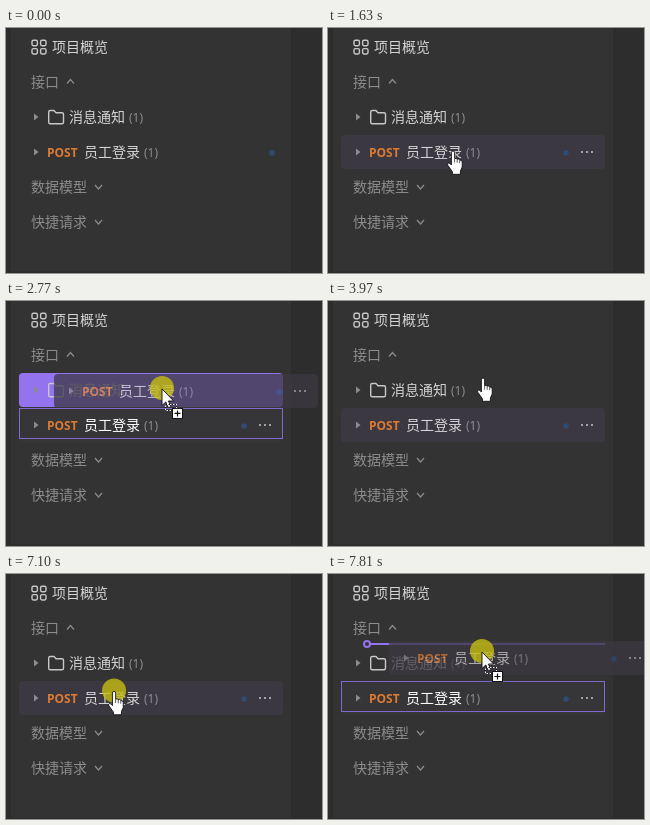
Recreate the animation shown at these times as an HTML page. Size 316 by 245 pixels, loop 8000 ms.

```html
<!DOCTYPE html>
<html lang="zh">
<head>
<meta charset="utf-8">
<style>
html, body { margin: 0; width: 100%; height: 100%; overflow: hidden; background: #2d2d2d; }
svg { display: block; width: 316px; height: 245px; }
text { font: 14px "Noto Sans CJK SC", "Noto Sans CJK", sans-serif; fill: #d4d4d4; }
.dim { fill: #8c8c8c; }
.count { font: 12px "Noto Sans", sans-serif; fill: #8c8c8c; }
.post { font: bold 12px "Noto Sans", sans-serif; fill: #dc7b33; }
.line { fill: none; stroke: #8c8c8c; stroke-width: 1.2; }
.icon { fill: none; stroke: #c8c8c8; stroke-width: 1.4; stroke-linejoin: round; }
</style>
</head>
<body>
<svg id="stage" viewBox="0 0 316 245"></svg>
<script>
const LOOP = 8000;
const PURPLE = '#9373ee';
const ROW = '#3c3842';

const label = (x, y, s, cls = '') => `<text x="${x}" y="${y}" class="${cls}">${s}</text>`;
const chevron = (x, y, d) => `<path class="line" d="M${x - 3.5} ${y - 2 * d}l3.5 ${4 * d}l3.5 ${-4 * d}"/>`;
const caret = y => `<path d="M28 ${y - 3.5}l4.5 3.5l-4.5 3.5z" fill="#8c8c8c"/>`;
const dots = y => [254, 259, 264].map(x => `<circle cx="${x}" cy="${y}" r="1" fill="#c4c4c4"/>`).join('');
const box = (id, y, fill) => `<rect id="${id}" x="13" y="${y}" width="264" height="34" rx="4" fill="${fill}"/>`;
const square = (x, y) => `<rect class="icon" x="${x}" y="${y}" width="5.4" height="5.4" rx="1.4"/>`;
const request = (id = '') => caret(124) + label(41, 129, 'POST', 'post') +
  `<text x="78" y="129" ${id}>员工登录</text>` + label(138, 129, '(1)', 'count');

const arrow = '<path d="M0 0V16.5L3.8 13L6.3 18.8L8.8 17.7L6.4 12H11.6Z" fill="#fff" stroke="#111" stroke-width=".9"/>';
const badge = `<rect x="3.5" y="15.5" width="11" height="6" fill="none" stroke="#fff"/>
  <rect x="3.5" y="15.5" width="11" height="6" fill="none" stroke="#111" stroke-dasharray="1.5 1.5"/>
  <rect x="10.5" y="19.5" width="10" height="10" fill="#fff" stroke="#111"/>
  <path d="M15.5 21.5v6M12.5 24.5h6" stroke="#111" stroke-width="1.2"/>`;
const hand = `<path d="M-1.6 1.6a1.6 1.6 0 0 1 3.2 0V7.6q1.7-.8 2.6.6q1.7-.6 2.5.8q2.3-.2 2.5 1.9V16l-1.8 4v3.3h-8v-2.6
  l-4.6-6.4q-.9-2 .9-2.3q1.4 0 2.7 2z" fill="#fff" stroke="#111" stroke-width=".9"/>
  <path d="M1.6 7.6v4M4.2 8.4v3.4M6.7 9.2v3" stroke="#333" stroke-width=".8"/>`;

const stage = document.getElementById('stage');
stage.innerHTML = `
  <rect width="316" height="245" fill="#2d2d2d"/>
  <rect x="5" width="280" height="243.5" fill="#333"/>
  ${square(26, 12.3)}${square(34.6, 12.3)}${square(26, 20.6)}${square(34.6, 20.6)}
  ${label(46, 24, '项目概览')}
  ${label(25, 59, '接口', 'dim')}${chevron(64.5, 53.5, -1)}
  ${box('folderBg', 72, '#2f2f2f')}
  ${box('target', 72, PURPLE)}
  ${caret(89)}
  <path class="icon" d="M42.7 84q0-1.5 1.5-1.5h3.8l2 2.2h6q1.5 0 1.5 1.5v8q0 1.5-1.5 1.5H44.2q-1.5 0-1.5-1.5z"/>
  ${label(63, 94, '消息通知')}${label(123, 94, '(1)', 'count')}
  <g id="folderTools">${dots(89)}<path d="M226 89h10M231 84v10" stroke="#b8b8b8" stroke-width="1.2"/></g>
  ${box('postBg', 107, ROW)}
  <rect id="border" x="13.5" y="107.5" width="263" height="30" fill="none" stroke="#8068cc"/>
  ${request('id="title"')}
  <circle id="dot" cy="125" r="2.8" fill="#2f4a73"/>
  <g id="postTools">${dots(124)}</g>
  ${label(25, 164, '数据模型', 'dim')}${chevron(92.5, 159, 1)}
  ${label(25, 199, '快捷请求', 'dim')}${chevron(92.5, 194, 1)}
  <g id="insert" fill="none" stroke="${PURPLE}" stroke-width="2"><circle cx="39" cy="70" r="3"/><path d="M42 70H277"/></g>
  <g id="ghost" opacity=".75">${box('ghostBg', 107, ROW)}${request()}
    <circle cx="238" cy="125" r="2.8" fill="#2f4a73"/>${dots(124)}</g>
  <g id="pointer">
    <circle id="press" cy="-1" r="12" fill="#c8c010" opacity=".78"/>
    <g id="hand">${hand}</g><g id="arrow">${arrow}</g><g id="badge">${badge}</g>
  </g>`;

const el = {};
stage.querySelectorAll('[id]').forEach(n => el[n.id] = n);

// pointer path: time, x, y
const path = [
  [140, 272, 243], [300, 250, 220], [500, 212, 180], [700, 176, 147], [800, 167, 137], [940, 159, 127],
  [970, 158, 127], [1200, 140, 126], [1450, 129, 124], [1630, 125, 123], [1740, 125, 123],
  [1950, 122, 122], [2090, 121, 122], [2300, 126, 117], [2500, 137, 106], [2770, 156, 88],
  [2890, 157, 81], [2940, 156, 80], [3210, 154, 76], [3660, 154, 76], [3970, 155, 77],
  [6170, 155, 77], [6200, 149, 80], [6350, 131, 93], [6520, 117, 107], [6700, 109, 116], [6810, 108, 118],
  [6990, 108, 118], [7100, 108, 117.5], [7250, 114, 113], [7450, 134, 97], [7650, 151, 81], [7780, 154, 78]
];
const drags = [
  { down: 1770, start: 2120, end: 3660, x: 121, y: 122 },
  { down: 6990, start: 7130, end: LOOP, x: 106, y: 118 }
];

function pointerAt(t) {
  const i = path.findIndex(p => p[0] > t);
  if (i < 0) return path[path.length - 1].slice(1);
  if (i === 0) return path[0].slice(1);
  const [a, b] = [path[i - 1], path[i]];
  const k = (t - a[0]) / (b[0] - a[0]);
  return [a[1] + (b[1] - a[1]) * k, a[2] + (b[2] - a[2]) * k];
}

const ramp = (t, from, ms) => Math.max(0, Math.min(1, (t - from) / ms));
const show = (node, on) => node.setAttribute('visibility', on ? 'visible' : 'hidden');
const fade = (node, k) => node.setAttribute('opacity', k);
const move = (node, x, y) => node.setAttribute('transform', `translate(${x.toFixed(2)} ${y.toFixed(2)})`);

function draw(t) {
  const [x, y] = pointerAt(t);
  const held = drags.find(d => t >= d.down && t < d.end);
  const drag = held && t >= held.start ? held : null;
  const onPost = t >= 760 && t < 4470 || t >= 6520;
  const onHand = !drag && y < 212;

  fade(el.postBg, drag ? 0.3 : t < 2120 ? ramp(t, 760, 150) : t < 4470 ? 0.3 + 0.7 * ramp(t, 3660, 250) : 1);
  fade(el.folderBg, t >= 4470 && t < 6520 ? ramp(t, 4470, 300) : 0);
  fade(el.folderTools, t >= 4470 && t < 6520 ? ramp(t, 4470, 250) : 0);
  show(el.postTools, onPost);
  el.dot.setAttribute('cx', onPost ? 238 : 266);
  show(el.border, drag);
  el.title.style.fill = drag ? '#fff' : '';

  show(el.target, drag && y >= 82 && y < 107);
  show(el.insert, drag && y < 82);
  show(el.ghost, drag);
  if (drag) move(el.ghost, x - drag.x, y - drag.y);

  show(el.pointer, t >= 140);
  move(el.pointer, x, y);
  fade(el.press, held ? 0.78 : 0);
  fade(el.hand, onHand ? 1 : 0);
  fade(el.arrow, onHand ? 0 : 1);
  fade(el.badge, drag ? 1 : 0);
}

const begin = performance.now();
function tick() {
  draw((performance.now() - begin) % LOOP);
  requestAnimationFrame(tick);
}
tick();
</script>
</body>
</html>
```
